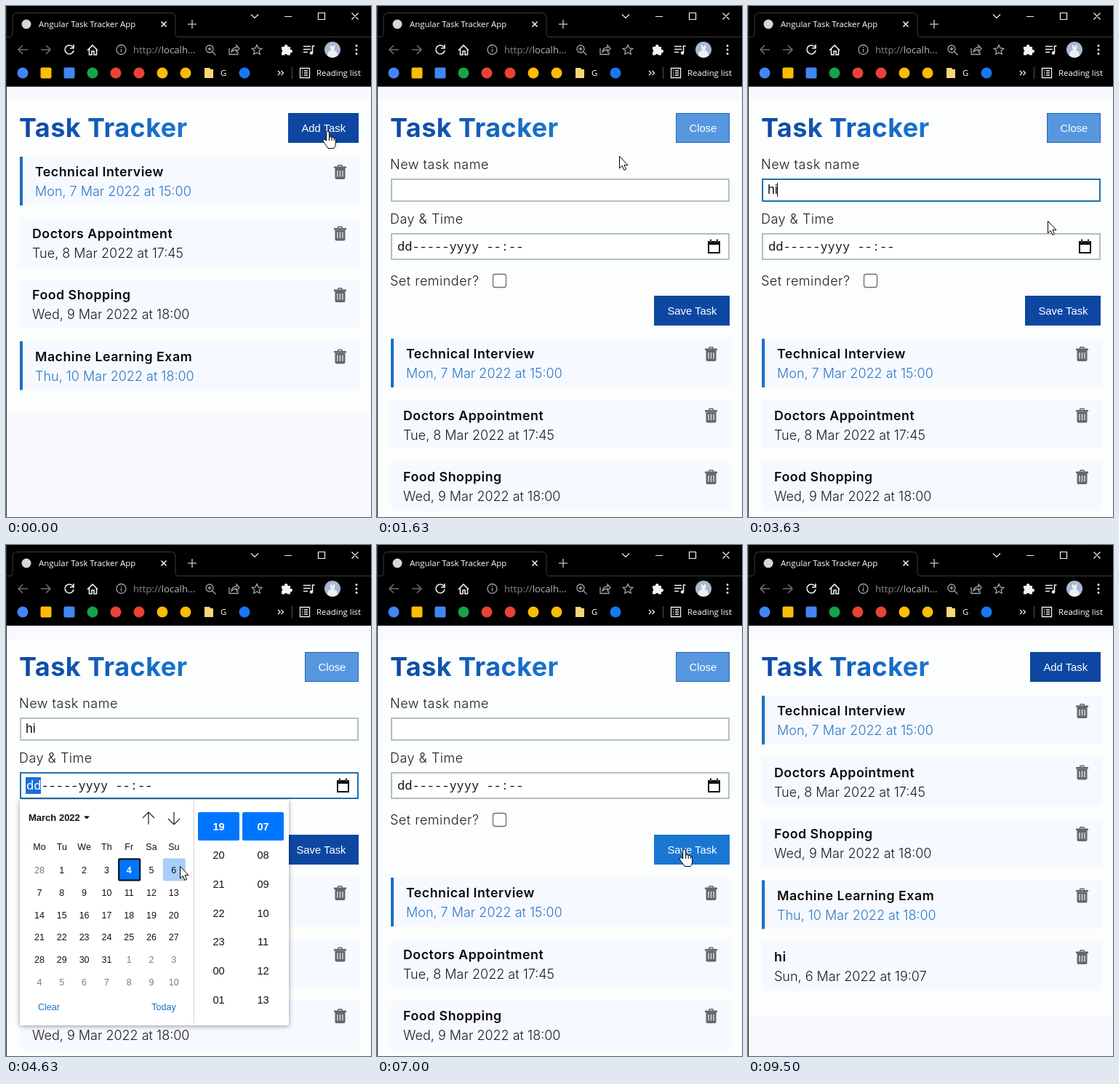
Write an HTML page that moves like this. It is 502 px wide and 702 px high and loops after 9.62 s.

```html
<!DOCTYPE html>
<html lang="en">
<head>
<meta charset="utf-8">
<title>Task Tracker</title>
<style>
html, body { margin: 0; width: 100%; height: 100%; overflow: hidden; background: #f8faff; }
svg { display: block; }
text { white-space: pre; }
.ui { font: 11.4px "Open Sans", sans-serif; fill: #fff; }
.url { font-size: 13.2px; fill: #858789; }
.h1 { font: 700 36px Inter, sans-serif; letter-spacing: .45px; }
.name { font: 600 17.8px Inter, sans-serif; letter-spacing: .5px; fill: #0b0b0e; }
.date { font: 300 18px Inter, sans-serif; fill: #1d1d20; }
.label { font: 300 18px Inter, sans-serif; letter-spacing: .5px; fill: #1d1d20; }
.btn { font: 14.8px "Liberation Sans", Arial, sans-serif; fill: #fff; }
.value { font: 17.5px "Liberation Sans", Arial, sans-serif; fill: #111; }
.mono { font: 17px "Noto Sans Mono", monospace; fill: #161616; }
.cal { font: 12.5px "Liberation Sans", Arial, sans-serif; fill: #111; text-anchor: middle; }
.clock { font-size: 14.6px; }
.icon { fill: none; stroke: #f1f1f1; stroke-width: 1.6; }
.dim { stroke: #6d6d6d; }
.soft { stroke: #a3a5a8; stroke-width: 1.3; }
</style>
</head>
<body>
<svg id="stage" width="502" height="702" viewBox="0 0 502 702">
  <defs>
    <linearGradient id="ink"><stop stop-color="#0d47a1"/><stop offset="1" stop-color="#1976d2"/></linearGradient>
    <clipPath id="fold"><rect id="foldBox" x="0" y="200" width="502" height="0"/></clipPath>
    <filter id="shade" x="-10%" y="-10%" width="120%" height="120%">
      <feDropShadow dx="0" dy="1" stdDeviation="3" flood-opacity=".4"/>
    </filter>
    <g id="bin" fill="#666769">
      <path d="M0 2.500h5V1.500Q5 0 6.500 0h4Q12 0 12 1.500v1h5v2.500H0zM6.500 1.400v1.100h4v-1.100z" fill-rule="evenodd"/>
      <path d="M1.500 5h14v13Q15.500 20 13.500 20h-10Q1.500 20 1.500 18z"/>
      <path d="M5 8v8.500M8.500 8v8.500M12 8v8.500" stroke="#e8eaee" stroke-width="1.3"/>
    </g>
  </defs>

  <rect width="502" height="702" fill="#f8faff"/>
  <rect id="panel" x="1" y="129" width="501" fill="#fcfdfd"/>
  <text class="h1" x="18" y="180" fill="url(#ink)">Task Tracker</text>
  <g id="toggle"></g>
  <g clip-path="url(#fold)"><g id="form">
    <text class="label" x="18" y="224">New task name</text>
    <rect id="nameBox" x="20" y="238" width="464" height="30" fill="#fff" stroke-width="2"/>
    <text id="nameText" class="value" x="27" y="258"></text>
    <path id="caret" d="M40.500 243v19" stroke="#000"/>
    <text class="label" x="18" y="299">Day &amp; Time</text>
    <rect id="dateBox" x="20" y="313" width="464" height="35" fill="#fff" stroke-width="2"/>
    <rect id="mark" x="27" y="319" width="21" height="23" fill="#1a6ed8"/>
    <text id="dateText" class="mono" x="28" y="336"></text>
    <path d="M455 323h17v17h-17zM457 328v10h13v-10zM458 320.500h2v3h-2zM467 320.500h2v3h-2z" fill="#111" fill-rule="evenodd"/>
    <text class="label" x="18" y="384">Set reminder?</text>
    <rect x="159.500" y="368.500" width="18" height="18" rx="3" fill="#fff" stroke="#6e6e6e" stroke-width="1.3"/>
    <g id="save"></g>
  </g></g>
  <g id="list"></g>
  <g id="picker"></g>

  <g id="chrome">
    <rect width="502" height="111" fill="#000"/>
    <path d="M0 42.500h5q4 0 4-5V16q0-6.500 6.500-6.500h211q6.500 0 6.500 6.500v21.500q0 5 4 5h265" fill="none" stroke="#3d3d3d"/>
    <circle cx="28" cy="25" r="6.500" fill="#d4d6d9"/>
    <text class="ui" x="45" y="29">Angular Task Tracker App</text>
    <path class="icon" d="M213.500 21.500l7 7m0-7l-7 7"/>
    <path class="icon" style="stroke:#aaa" d="M256 19v12m-6-6h12"/>
    <path class="icon" style="stroke-width:1.200" d="M337 11.500l5 5 5-5M383 14.500h10M429.500 9.500h9v9h-9zM475.500 9.500l9 9m0-9l-9 9"/>
    <path class="icon dim" d="M30 60H17m6-6l-6 6 6 6M48 60h13m-6-6l6 6-6 6"/>
    <path class="icon" d="M92 56.500A6 6 0 1 0 93 61M93 53v5h-5M112 61l7-7 7 7M114.500 59v8h3.500v-5h3v5h3.500v-8"/>
    <g class="icon soft">
      <circle cx="158.500" cy="60" r="6.500"/><path d="M158.500 59v4.500m0-7.500v1.500"/>
      <circle cx="280" cy="59" r="5"/><path d="M283.500 62.500l5 5M277.500 59h5m-2.500-2.500v5"/>
      <path d="M307 58v8.500h12V63M310 63q1-6 7-6v-3l4 4.500-4 4.500v-3q-4 0-7 3z"/>
      <path d="M345 53.500l2 4.400 4.800.5-3.600 3.200 1 4.700-4.200-2.400-4.200 2.400 1-4.700-3.600-3.200 4.800-.5z"/>
    </g>
    <text class="ui url" x="175" y="65">http://<tspan fill="#b4b6b8">localh...</tspan></text>
    <path d="M379 56h4a2.300 2.300 0 1 1 4.400 0h3.600v4a2.300 2.300 0 1 1 0 4.400v3h-4a2.200 2.200 0 0 0-4 0h-4v-4a2.300 2.300 0 0 0 0-4z" fill="#f4f4f4"/>
    <path class="icon" d="M409 55.500h10m-10 4h10m-10 4h6M421.500 64v-9h3"/><circle cx="420" cy="64.500" r="2.200" fill="#f1f1f1"/>
    <circle cx="449" cy="60" r="11" fill="#a9b9cf"/>
    <path d="M442 68q0-7 5-7-2-4-1-8l3 3 3-3q1 5-1 8 5 1 5 7-7 6-14 0z" fill="#edf0f2"/>
    <path d="M482 54.500v12" stroke="#f1f1f1" stroke-width="3" stroke-linecap="round" stroke-dasharray="0 5.500"/>
    <g id="marks"></g>
    <path d="M273 85h7l1.500 2h3.500v12h-12z" fill="#f8d775"/>
    <text class="ui" x="295" y="96">G</text>
    <path class="icon" style="stroke-width:1.300" d="M374 89l3 3-3 3m4.500-6l3 3-3 3M404.500 85.500h13v13h-13zM407 89h1m2 0h5m-8 3h1m2 0h5m-8 3h1m2 0h5"/>
    <path d="M393.500 84v16" stroke="#555"/>
    <text class="ui" x="427" y="96">Reading list</text>
    <path d="M0 110.500h502" stroke="#2c2c2c"/>
    <path d="M.5 0v702" stroke="#333"/>
  </g>

  <g id="pointer" stroke="#000" fill="#fff" stroke-linejoin="round">
    <path id="arrow" d="M.5.500v16.500l3.800-3.500 2.600 6 2.700-1.200-2.600-5.700h5z"/>
    <path id="hand" d="M-2.500 13V2q0-2 2-2t2 2v6q2-1.500 3.500.5 2-1 3.200 1 2.300-.4 2.300 2.500v5q0 3.500-2.500 6.500h-8q-2-3-5-7-3-4-1.500-5t4 1.500zM1.500 8v5M5 8.500V13M8.200 9.500V13"/>
    <path id="beam" fill="none" d="M-3-8Q0-8 0-6V6Q0 8-3 8M3-8Q0-8 0-6V6Q0 8 3 8"/>
  </g>
</svg>
<script>
const LOOP = 9620, STEP = 125, FORM = 250, ROW = 84.5;
const $ = id => document.getElementById(id);
const show = (id, on) => { $(id).style.display = on ? '' : 'none'; };
const text = (cls, x, y, s, extra = '') => `<text class="${cls}" x="${x}" y="${y}" ${extra}>${s}</text>`;
const rect = (x, y, w, h, fill, extra = '') =>
  `<rect x="${x}" y="${y}" width="${w}" height="${h}" fill="${fill}" ${extra}/>`;
const button = (x, y, label, fill, edge = fill) =>
  rect(x + .5, y + .5, 484 - x, 40, fill, `stroke="${edge}"`) + text('btn', x + 18.5, y + 26, label);

const tasks = [
  ['Technical Interview', 'Mon, 7 Mar 2022 at 15:00', true],
  ['Doctors Appointment', 'Tue, 8 Mar 2022 at 17:45'],
  ['Food Shopping', 'Wed, 9 Mar 2022 at 18:00'],
  ['Machine Learning Exam', 'Thu, 10 Mar 2022 at 18:00', true],
  ['hi', 'Sun, 6 Mar 2022 at 19:07']
];

// Time, openness of the form
const fold = [[0, 0], [250, 0], [500, 1], [750, 1], [875, .188], [1000, 0], [1125, 0], [1375, 1],
  [8250, 1], [8375, .7], [8625, 0]];

// Time, x, y of the pointer tip
const path = [[0, 443, 172], [1250, 443, 172], [1625, 333, 206], [2250, 333, 206], [2625, 300, 253],
  [3250, 300, 253], [3625, 412, 295], [4000, 463, 331], [4250, 463, 331], [4625, 239, 441],
  [5000, 239, 441], [5375, 420, 376], [5875, 424, 418], [7250, 423, 418], [7750, 446, 168],
  [8625, 446, 168], [9000, 506, 190]];

function at(keys, t) {
  const i = keys.findIndex(k => k[0] > t);
  if (i < 0) return keys[keys.length - 1].slice(1);
  const a = keys[i - 1], b = keys[i], p = (t - a[0]) / (b[0] - a[0]);
  return a.slice(1).map((v, n) => v + (b[n + 1] - v) * p);
}

function drawMarks() {
  const colours = ['#4285f4', '#fbbc04', '#4285f4', '#16a34a', '#ea4335', '#ea4335', '#fbbc04', '#fbbc04'];
  const dot = (x, c) => `<circle cx="${x}" cy="92" r="7.5" fill="${c}"/>`;
  const square = (x, c) => rect(x - 7.5, 84.5, 15, 15, c, 'rx="2"');
  $('marks').innerHTML = dot(328, '#1877f2') +
    colours.map((c, i) => (i === 1 || i === 2 ? square : dot)(23 + i * 32, c)).join('');
}

function drawList() {
  $('list').innerHTML = tasks.map(([name, date, alert], i) => {
    const y = 207 + i * ROW, x = alert ? 40 : 36;
    return `<g>${rect(19, y, 468, 67, '#f6f9ff')}${alert ? rect(19, y, 4, 67, '#1a70c2') : ''}` +
      text('name', x, y + 27, name) +
      text('date', x, y + 54, date, alert ? 'style="fill:#2b78c9"' : '') +
      `<use href="#bin" x="451" y="${y + 11}"/></g>`;
  }).join('');
}

function drawPicker(hover, chosen) {
  let s = rect(19, 350, 370, 310, '#fff', 'rx="2" filter="url(#shade)"') +
    '<path d="M258.500 351v306" stroke="#d2d2d2"/>' +
    text('cal', 31, 379, 'March 2022', 'style="text-anchor:start;font-weight:700;font-size:13px"') +
    '<path d="M107 372.500h8l-4 4z"/>' +
    '<path d="M196 384v-17m-8 8l8-8 8 8M231 367v17m-8-8l8 8 8-8" fill="none" stroke="#222" stroke-width="1.2"/>';
  ['Mo', 'Tu', 'We', 'Th', 'Fr', 'Sa', 'Su'].forEach((d, i) => { s += text('cal', 46 + i * 30.8, 419, d); });
  for (let i = 0; i < 42; i++) {
    const x = 46 + i % 7 * 30.8, y = 446 + Math.floor(i / 7) * 30.8;
    const day = i < 1 ? 28 : (i - 1) % 31 + 1, inside = i > 0 && i < 32;
    const on = inside && day === chosen;
    if (on || inside && hover && day === 6) s += rect(x - 15, y - 15.5, 31, 31, on ? '#0075ff' : '#a9cef9', 'rx="2"');
    if (inside && day === 4) s += rect(x - 14, y - 14.5, 29, 29, 'none', 'rx="1" stroke="#101010" stroke-width="2"');
    s += text('cal', x, y + 5, day, `style="fill:${on ? '#fff' : inside ? '#111' : '#7b7b7b'};font-weight:${on ? 700 : 400}"`);
  }
  [[292.5, 19, 24], [353.5, 7, 60]].forEach(([x, first, mod]) => {
    s += rect(x - 28.5, 367, 57, 39, '#0075ff', 'rx="2"');
    for (let i = 0; i < 7; i++)
      s += text('cal clock', x, 391.5 + i * 39.7, String((first + i) % mod).padStart(2, '0'),
        i ? '' : 'style="fill:#fff;font-weight:700"');
  });
  s += text('cal', 59, 639, 'Clear', 'style="fill:#1570cd"') + text('cal', 217, 639, 'Today', 'style="fill:#1570cd"');
  $('picker').innerHTML = s;
}

function draw(t) {
  const [open] = at(fold, t), [x, y] = at(path, t);
  const between = (a, b) => t >= a && t < b;
  const saved = t >= 6750, picking = between(4250, 5375);

  const count = saved ? 5 : 4, shift = open * FORM;
  $('list').setAttribute('transform', `translate(0 ${shift})`);
  $('list').lastElementChild.style.display = saved ? '' : 'none';
  $('panel').setAttribute('height', 207 + (count - 1) * ROW + 100 + shift - 129);
  $('foldBox').setAttribute('height', open ? 7 + shift : 0);
  $('form').setAttribute('opacity', open < 1 ? open * open * 3 / (1 + 2 * open) : 1);

  const closing = between(250, 750) || between(1125, 8250);
  $('toggle').innerHTML = closing ? button(411, 147, 'Close', '#5797df', '#2867ad') : button(388, 147, 'Add Task', '#0d47a1');
  $('save').innerHTML = button(381, 398, 'Save Task', between(5875, 7375) ? '#1976d2' : '#0d47a1');

  const naming = between(2625, 4000), dating = between(4000, 6750);
  const typed = saved || t < 3125 ? '' : t < 3375 ? 'h' : 'hi';
  $('nameText').textContent = typed;
  $('nameBox').setAttribute('stroke', naming ? '#1f71ae' : '#b0bec9');
  $('dateBox').setAttribute('stroke', dating ? '#1f71ae' : '#b0bec9');
  $('caret').setAttribute('transform', `translate(${[-13, -3, 0][typed.length]} 0)`);
  show('caret', naming && Math.floor(t / 500) % 2);

  const dated = between(4875, 6750), marked = between(4250, 5875);
  show('mark', marked);
  const first = dated ? '06' : 'dd';
  $('dateText').innerHTML = (marked ? `<tspan fill="#fff">${first}</tspan>` : first) +
    (dated ? '-Mar-2022 19:07' : '-----yyyy --:--');

  show('picker', picking);
  if (picking) drawPicker(between(4500, 4875), dated ? 6 : 4);

  const hand = t <= 1250 || between(5875, 7375) || between(7625, 8875);
  const beam = between(2500, 3375);
  show('hand', hand);
  show('beam', beam);
  show('arrow', !hand && !beam);
  show('pointer', t < 9000);
  $('pointer').setAttribute('transform', `translate(${x} ${y})`);
}

drawMarks();
drawList();
const start = performance.now();
let last = -1;
function tick(now) {
  const ms = Math.max(0, now - start) % LOOP;
  const step = Math.floor(Math.floor(ms / 10) * 10 / STEP);
  if (step !== last) draw((last = step) * STEP);
  requestAnimationFrame(tick);
}
draw(0);
requestAnimationFrame(tick);
</script>
</body>
</html>
```
